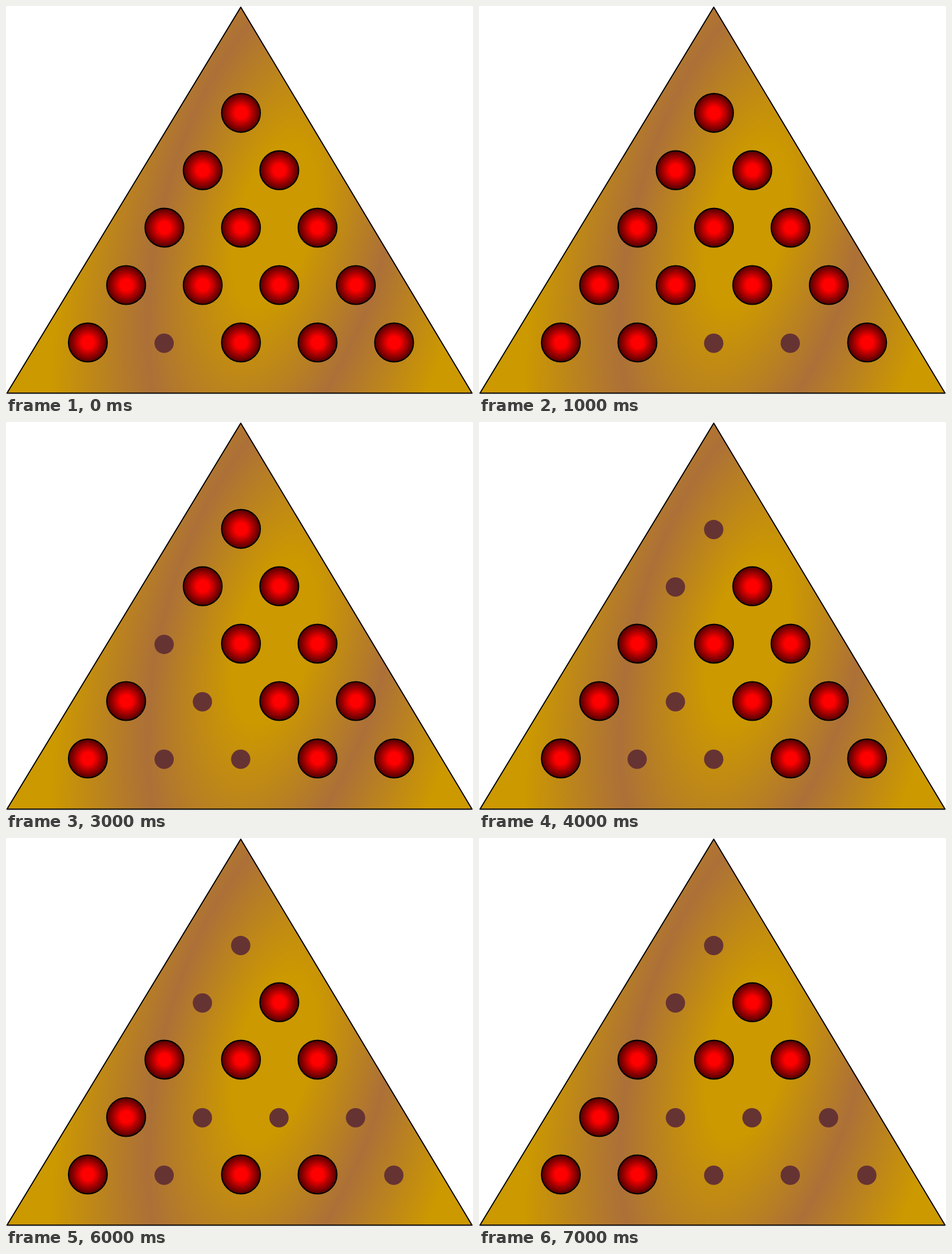
Recreate the animation shown at these times as an HTML page. Size 821 by 682 pixels, loop 8000 ms.

```html
<!DOCTYPE html>
<html lang="en">
<head>
<meta charset="utf-8">
<title>Peg solitaire</title>
<style>
  html, body { margin: 0; width: 100%; height: 100%; overflow: hidden; background: #fff; }
  svg { display: block; width: 821px; height: 682px; }
</style>
</head>
<body>
<svg viewBox="0 0 821 682">
  <defs>
    <radialGradient id="wood" gradientUnits="userSpaceOnUse" cx="0" cy="0" r="2"
      gradientTransform="translate(472 386) rotate(15) scale(198.5 446)">
      <stop offset=".165" stop-color="#cc9900"/>
      <stop offset=".5" stop-color="#ac7038"/>
      <stop offset=".88" stop-color="#cc9900"/>
    </radialGradient>
    <radialGradient id="red">
      <stop offset=".3" stop-color="#ff0000"/>
      <stop offset="1" stop-color="#500000"/>
    </radialGradient>
  </defs>
  <path d="M412.7 2L819.3 680.5H1.7Z" fill="url(#wood)" stroke="#000" stroke-width="2" stroke-linejoin="round"/>
  <g id="holes" fill="#663333"></g>
  <g id="pegs" fill="url(#red)" stroke="#000" stroke-width="2.2"></g>
</svg>
<script>
  const STEP = 1000, LOOP = 8000, START = 11;
  // Holes are numbered row by row from the top: [from, over, to]
  const jumps = [
    [13, 12, 11], [3, 7, 12], [11, 12, 13], [0, 1, 3],
    [5, 8, 12], [14, 9, 5], [13, 12, 11]
  ];

  function circle(parent, cx, cy, r) {
    const el = document.createElementNS('http://www.w3.org/2000/svg', 'circle');
    for (const [key, value] of Object.entries({ cx, cy, r })) el.setAttribute(key, value);
    return document.getElementById(parent).appendChild(el);
  }

  const pegs = [];
  for (let row = 0; row < 5; row++) {
    for (let col = 0; col <= row; col++) {
      const x = 412.6 + (col - row / 2) * 134.6, y = 187.8 + row * 100.9;
      circle('holes', x, y + 1.3, 17);
      pegs.push(circle('pegs', x + 0.5, y, 34));
    }
  }

  const boards = [pegs.map((_, i) => i !== START)];
  for (const [from, over, to] of jumps) {
    const next = boards.at(-1).slice();
    next[from] = next[over] = false;
    next[to] = true;
    boards.push(next);
  }

  const t0 = performance.now();
  let shown = -1;
  function draw(now) {
    const step = Math.floor(Math.max(0, now - t0) % LOOP / STEP);
    if (step !== shown) {
      shown = step;
      pegs.forEach((peg, i) => peg.setAttribute('visibility', boards[step][i] ? 'visible' : 'hidden'));
    }
    requestAnimationFrame(draw);
  }
  draw(t0);
</script>
</body>
</html>
```
